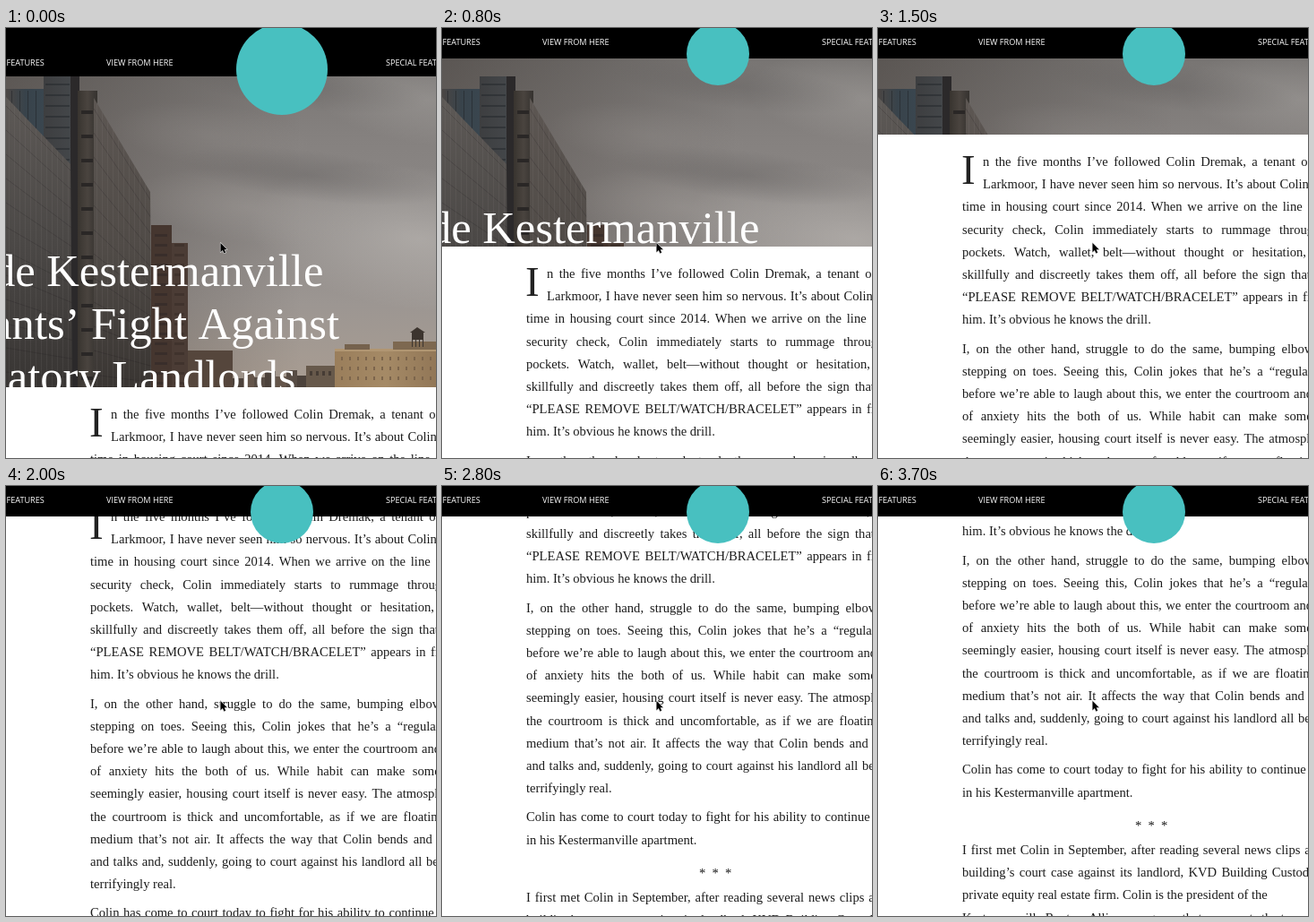
These frames come from a looping animation (480x480 px, 3800 ms). An HTML page with a canvas:

```html
<!DOCTYPE html>
<html lang="en">
<head>
<meta charset="utf-8">
<title>Scrolling article</title>
<style>
html, body { margin: 0; width: 100%; height: 100%; overflow: hidden; background: #fff; }
canvas { display: block; width: 480px; height: 480px; }
</style>
</head>
<body>
<canvas id="stage" width="480" height="480"></canvas>
<script>
const SIZE = 480, LOOP = 3800, STEP = 100;
const LEFT = 94, RIGHT = 520, LEAD = 25.2, PARA = 32.2;
const SERIF = '"Liberation Serif", "Times New Roman", serif';
const SANS = '"Open Sans", "Noto Sans", sans-serif';
const ctx = document.getElementById('stage').getContext('2d');

// [time, scroll offset]
const SCROLL = [[0, 0], [300, 57], [800, 157], [1500, 282], [2000, 397], [2800, 504], [3700, 557]];

// Lines starting with "<" stay ragged.
const PARAGRAPHS = [
  ['n the five months I’ve followed Colin Dremak, a tenant of 4150',
   'Larkmoor, I have never seen him so nervous. It’s about Colin’s fifth',
   'time in housing court since 2014. When we arrive on the line for the',
   'security check, Colin immediately starts to rummage through his',
   'pockets. Watch, wallet, belt—without thought or hesitation, Colin',
   'skillfully and discreetly takes them off, all before the sign that reads',
   '“PLEASE REMOVE BELT/WATCH/BRACELET” appears in front of',
   '<him. It’s obvious he knows the drill.'],
  ['I, on the other hand, struggle to do the same, bumping elbows and',
   'stepping on toes. Seeing this, Colin jokes that he’s a “regular,” but',
   'before we’re able to laugh about this, we enter the courtroom and a jolt',
   'of anxiety hits the both of us. While habit can make some days',
   'seemingly easier, housing court itself is never easy. The atmosphere in',
   'the courtroom is thick and uncomfortable, as if we are floating in a',
   'medium that’s not air. It affects the way that Colin bends and moves',
   'and talks and, suddenly, going to court against his landlord all becomes',
   '<terrifyingly real.'],
  ['Colin has come to court today to fight for his ability to continue to live',
   '<in his Kestermanville apartment.'],
  ['*'],
  ['I first met Colin in September, after reading several news clips about a',
   'building’s court case against its landlord, KVD Building Custodians, a',
   '<private equity real estate firm. Colin is the president of the',
   '<Kestermanville Renters Alliance, a group that represents the tenants']
];
const TITLE = ['Inside Kestermanville', 'Tenants’ Fight Against', 'Predatory Landlords'];

const mix = (a, b, k) => a + (b - a) * k;
const clamp = v => Math.max(0, Math.min(1, v));

// Smooth curve through the scroll keys.
function scrollAt(t) {
  const n = SCROLL.length - 1;
  if (t >= SCROLL[n][0]) return SCROLL[n][1];
  const i = SCROLL.findIndex(k => k[0] > t) - 1;
  const rate = j => {
    const c = Math.max(0, Math.min(n - 1, j));
    return (SCROLL[c + 1][1] - SCROLL[c][1]) / (SCROLL[c + 1][0] - SCROLL[c][0]);
  };
  const slope = j => (rate(j - 1) + rate(j)) / 2;
  const [t0, a] = SCROLL[i], [t1, b] = SCROLL[i + 1];
  const d = t1 - t0, u = (t - t0) / d, v = 1 - u;
  return a * v * v * (1 + 2 * u) + b * u * u * (3 - 2 * u)
    + d * u * v * (v * slope(i) - u * slope(i + 1));
}

function makeScene() {
  const cv = document.createElement('canvas');
  cv.width = cv.height = SIZE;
  const g = cv.getContext('2d');

  const ramp = (x0, y0, x1, y1, colors) => {
    const r = g.createLinearGradient(x0, y0, x1, y1);
    colors.forEach((c, i) => r.addColorStop(i / (colors.length - 1), c));
    return r;
  };
  const box = (x, y, w, h, fill) => { g.fillStyle = fill; g.fillRect(x, y, w, h); };
  const trace = pts => {
    g.beginPath();
    pts.forEach(p => g.lineTo(p[0], p[1]));
    g.closePath();
  };
  const cloud = (x, y, rx, ry, rgb, alpha) => {
    g.save();
    g.translate(x, y);
    g.rotate(0.12);
    g.scale(rx, ry);
    const r = g.createRadialGradient(0, 0, 0, 0, 0, 1);
    r.addColorStop(0, `rgba(${rgb},${alpha})`);
    r.addColorStop(0.5, `rgba(${rgb},${alpha * 0.55})`);
    r.addColorStop(1, `rgba(${rgb},0)`);
    g.fillStyle = r;
    g.fillRect(-1, -1, 2, 2);
    g.restore();
  };
  // Glass wall with slanted floors and upright mullions.
  const facade = (pts, fill, x0, x1, top, slant) => {
    g.save();
    trace(pts);
    g.fillStyle = fill;
    g.fill();
    g.clip();
    g.lineWidth = 1;
    g.strokeStyle = 'rgba(25,24,25,.2)';
    g.beginPath();
    for (let i = 0; i < 15; i++) {
      const y = top + i * 27;
      g.moveTo(x0, y);
      g.lineTo(x1, y + slant * (1 - i / 12));
    }
    g.stroke();
    g.strokeStyle = 'rgba(150,143,137,.12)';
    g.beginPath();
    for (let x = x0 + 3; x < x1; x += 6) {
      g.moveTo(x + 0.5, 50);
      g.lineTo(x + 0.5, 410);
    }
    g.stroke();
    g.restore();
  };

  // Sky, darker to the left
  box(0, 0, SIZE, SIZE, ramp(0, 30, 0, 400, ['#777472', '#85817f', '#8d8987', '#9c9692', '#a99d92']));
  box(0, 0, SIZE, SIZE, ramp(0, 0, 330, 0, ['rgba(62,56,52,.5)', 'rgba(62,56,52,.25)', 'rgba(62,56,52,0)']));
  cloud(460, 235, 190, 80, '190,186,182', 0.6);
  cloud(470, 80, 130, 50, '168,165,162', 0.45);
  cloud(270, 200, 130, 40, '165,160,156', 0.4);
  cloud(230, 120, 110, 35, '150,146,143', 0.3);
  cloud(340, 165, 150, 28, '92,89,88', 0.35);
  cloud(330, 65, 140, 26, '92,89,88', 0.3);

  // Rear blocks and shaft
  box(0, 68, 44, 130, ramp(0, 0, 44, 0, ['#4a4644', '#38434b', '#3a464f']));
  for (let x = 6; x < 42; x += 9) box(x, 70, 1, 110, 'rgba(30,33,37,.5)');
  box(42, 54, 32, 150, ramp(42, 0, 74, 0, ['#3d3e40', '#44474a']));
  for (let y = 62; y < 180; y += 12) box(44, y, 27, 2, 'rgba(35,38,42,.5)');
  box(72, 54, 10, 348, '#2b292a');
  box(80, 70, 22, 332, ramp(80, 0, 102, 0, ['#38342f', '#4a443f', '#35322f']));
  for (let y = 92; y < 402; y += 27) box(84, y, 13, 4, '#2a2726');

  facade([[0, 77], [20, 98], [72, 152], [74, 402], [0, 402]],
    ramp(0, 80, 40, 400, ['#5d5956', '#4b4846', '#383533']), 0, 74, 87, 74);
  facade([[98, 78], [161, 183], [163, 402], [98, 402]],
    ramp(98, 90, 150, 400, ['#5c5652', '#504b47', '#393532']), 98, 163, 90, 105);

  // Brick block
  box(162, 220, 23, 182, '#45362f');
  box(185, 240, 18, 162, '#4b3c35');
  for (let y = 230; y < 398; y += 11) {
    box(166, y, 14, 3, '#392e2a');
    if (y > 240) box(188, y, 11, 3, '#40332d');
  }

  // Low skyline
  box(203, 360, 50, 42, '#55463c');
  for (let i = 0; i < 7; i++) {
    const h = 11 + (i * 7) % 13;
    box(253 + i * 12, 402 - h, 12, h, ['#4c423b', '#64554a', '#574c44'][i % 3]);
  }
  box(335, 377, 34, 25, '#67594b');
  for (let x = 339; x < 365; x += 7) box(x, 383, 3, 5, '#463c35');
  box(367, 360, 113, 42, ramp(367, 0, 480, 0, ['#9a7e5b', '#a58a66', '#927757']));
  box(367, 358, 113, 3, '#b19672');
  box(378, 353, 28, 6, '#75624d');
  box(432, 350, 48, 9, '#7d6850');
  for (let y = 367; y < 398; y += 11)
    for (let x = 374; x < 478; x += 9) box(x, y, 2, 4, '#7c654c');

  // Water tower
  box(453, 339, 13, 9, '#3c342e');
  trace([[451, 340], [459, 334], [468, 340]]);
  g.fill();
  for (let x = 453; x < 467; x += 4) box(x, 348, 1, 8, '#3c342e');
  return cv;
}
const scene = makeScene();

function setType(size, family, color) {
  ctx.font = `${size}px ${family}`;
  ctx.fillStyle = color;
}

function justify(line, x, y) {
  const words = line.split(' ');
  const widths = words.map(w => ctx.measureText(w).width);
  const gap = (RIGHT - x - widths.reduce((a, b) => a + b, 0)) / (words.length - 1);
  words.forEach((w, i) => {
    ctx.fillText(w, x, y);
    x += widths[i] + gap;
  });
}

function drawArticle(first) {
  setType(47, SERIF, '#222');
  ctx.fillText('I', LEFT - 1, first + 19.5);
  setType(14.6, SERIF, '#1c1c1c');
  let y = first;
  PARAGRAPHS.forEach((lines, p) => {
    lines.forEach((line, i) => {
      const x = p === 0 && i < 2 ? 117 : LEFT;
      if (y > 0 && y < SIZE + 20) {
        if (line === '*') {
          for (let k = -1; k < 2; k++) ctx.fillText('*', 301.4 + k * 14.5, y + 5);
        } else if (line[0] === '<') ctx.fillText(line.slice(1), x, y);
        else justify(line, x, y);
      }
      y += i < lines.length - 1 ? LEAD : PARA;
    });
  });
}

function drawHero(scroll) {
  const bottom = 401 - scroll;
  if (bottom <= 0) return;
  ctx.save();
  ctx.beginPath();
  ctx.rect(0, 0, SIZE, bottom);
  ctx.clip();
  ctx.drawImage(scene, 0, 0);
  const lift = scroll < 57 ? scroll * 0.28 : 16 + (scroll - 57) * 0.32;
  setType(50.6, SERIF, '#fff');
  TITLE.forEach((line, i) => ctx.fillText(line, -91, 288 - lift + i * 59));
  ctx.restore();
}

function drawHeader(t) {
  const p = clamp((t - 100) / 400);
  const k = 1 - Math.pow(1 - p, 1.85);
  ctx.fillStyle = '#000';
  ctx.fillRect(0, 0, SIZE, Math.round(mix(54, 34, k)));
  const navY = Math.round(mix(42, 18.5, p));
  setType(9.15, SANS, '#fff');
  ctx.fillText('FEATURES', 0.5, navY);
  ctx.fillText('VIEW FROM HERE', 112, navY);
  ctx.fillText('SPECIAL FEATURES', 424, navY);
  ctx.fillStyle = '#48c0c0';
  ctx.beginPath();
  ctx.arc(308, mix(46, 29, k), mix(51, 35, k), 0, Math.PI * 2);
  ctx.fill();
}

const arrow = new Path2D('M0 0V10.2L2.4 8L3.9 11.4L5.6 10.7L4.2 7.3H7.2Z');
function drawCursor() {
  ctx.save();
  ctx.translate(239.5, 240);
  ctx.lineWidth = 1.2;
  ctx.lineJoin = 'round';
  ctx.strokeStyle = '#ddd';
  ctx.stroke(arrow);
  ctx.fillStyle = '#000';
  ctx.fill(arrow);
  ctx.restore();
}

function draw(t) {
  const scroll = Math.round(scrollAt(t));
  ctx.fillStyle = '#fff';
  ctx.fillRect(0, 0, SIZE, SIZE);
  drawArticle(436 - scroll);
  drawHero(scroll);
  drawHeader(t);
  drawCursor();
}

const start = performance.now();
function tick() {
  const t = (performance.now() - start) % LOOP;
  draw(Math.floor(t / STEP) * STEP);
  requestAnimationFrame(tick);
}
tick();
</script>
</body>
</html>
```
